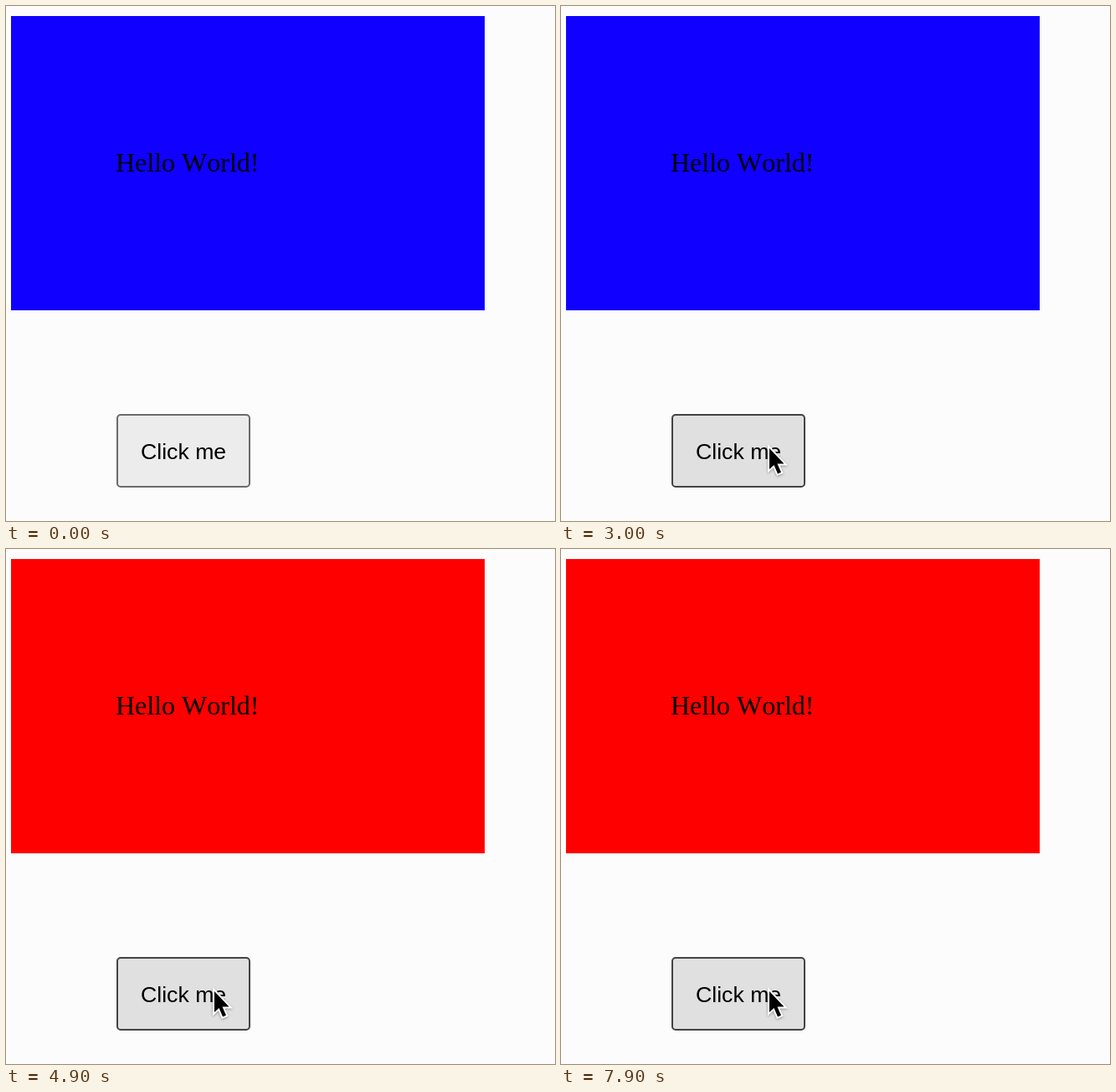
Write an HTML page that moves like this. It is 656 px wide and 616 px high and loops after 8000 ms.

```html
<!DOCTYPE html>
<html lang="en">
<head>
<meta charset="utf-8">
<title>Click me</title>
<style>
  html, body { margin: 0; width: 100%; height: 100%; overflow: hidden; background: #fcfcfc; }
  svg { display: block; width: 656px; height: 616px; }
  .hello { font: 32px "Liberation Serif", "Times New Roman", serif; font-kerning: none; }
  .label { font: 26.667px "Liberation Sans", Arial, sans-serif; }
  #cursor { filter: drop-shadow(0 1.5px 1.5px rgba(0, 0, 0, .35)); }
</style>
</head>
<body>
<svg viewBox="0 0 656 616">
  <rect id="box" x="6" y="12" width="566" height="352"/>
  <text class="hello" x="131" y="198">Hello World!</text>
  <rect id="button" x="133" y="489" width="158" height="86" rx="4" stroke-width="2"/>
  <text class="label" x="161" y="542">Click me</text>
  <g id="cursor">
    <path d="M0 0V25L5.5 20L10 30.5L14 28.8L9.5 18.5H17.5Z"
          stroke="#fff" stroke-width="4" paint-order="stroke"/>
  </g>
</svg>
<script>
  const LOOP = 8000;
  const BLUE = '#0f00ff', RED = '#ff0000';
  const looks = {
    idle:  ['#ececec', '#6b6b6b'],
    hover: ['#e0e0e0', '#434343'],
    down:  ['#f4f4f4', '#858585']
  };

  // start time, box colour, button look, pointer position
  const steps = [
    [0,    BLUE, 'idle',  null],
    [2400, BLUE, 'idle',  [259, 589]],
    [2500, BLUE, 'hover', [249, 529]],
    [3500, BLUE, 'down',  [249, 529]],
    [3700, RED,  'hover', [249, 529]]
  ];

  const get = id => document.getElementById(id);
  const box = get('box'), button = get('button'), cursor = get('cursor');
  let shown;

  function draw(step) {
    const [, color, look, at] = step;
    const [fill, stroke] = looks[look];
    box.setAttribute('fill', color);
    button.setAttribute('fill', fill);
    button.setAttribute('stroke', stroke);
    cursor.setAttribute('visibility', at ? 'visible' : 'hidden');
    if (at) cursor.setAttribute('transform', `translate(${at})`);
  }

  const start = performance.now();
  function tick() {
    const t = (performance.now() - start) % LOOP;
    const step = steps.filter(s => s[0] <= t).pop();
    if (step !== shown) draw(shown = step);
    requestAnimationFrame(tick);
  }
  tick();
</script>
</body>
</html>
```
